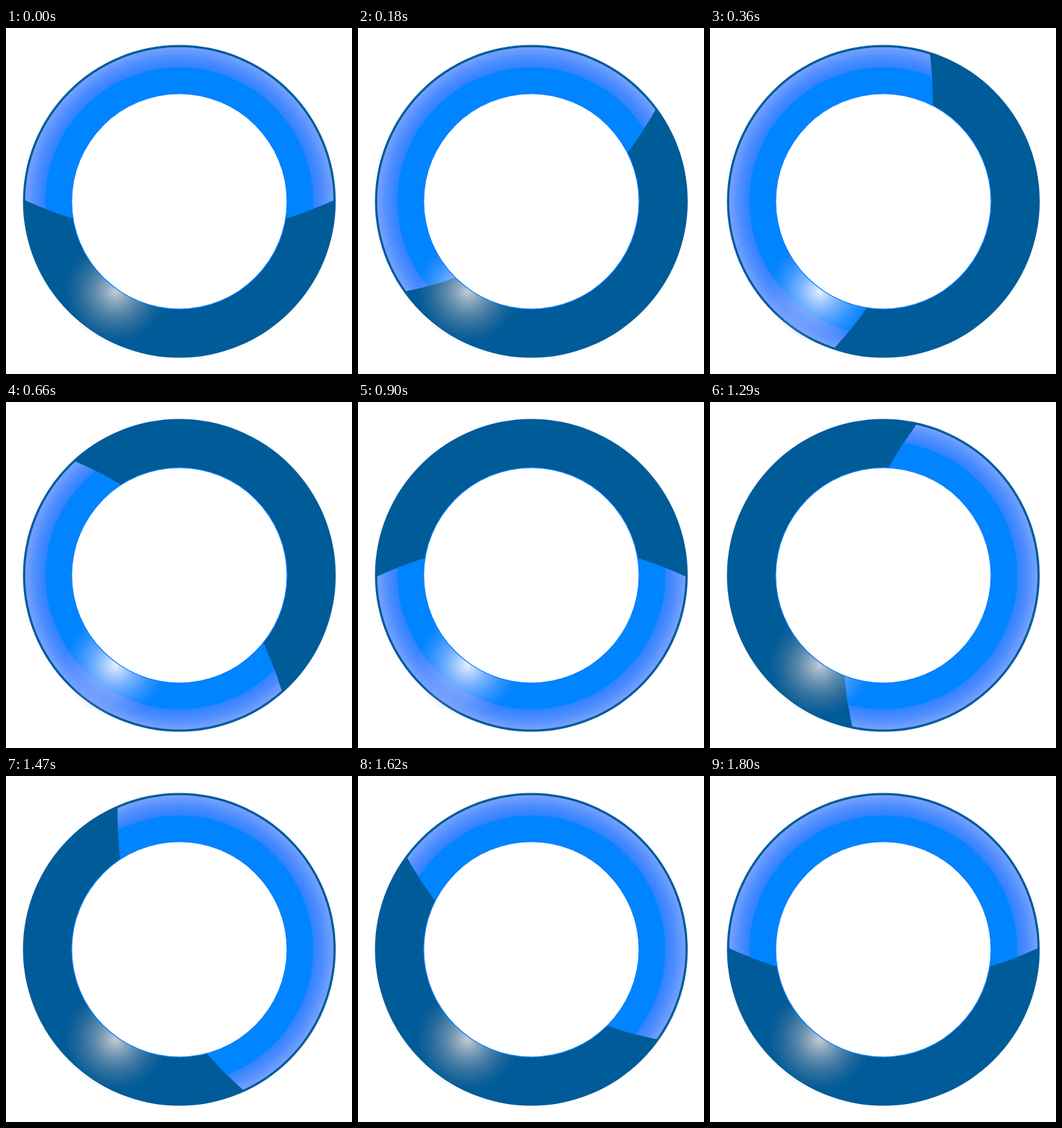
These frames come from a looping animation (500x500 px, 1.83 s). An HTML page with a canvas:

```html
<!DOCTYPE html>
<html>
<head>
<meta charset="utf-8">
<style>
  html, body { margin: 0; width: 100%; height: 100%; overflow: hidden; background: #fff; }
  canvas { display: block; }
</style>
</head>
<body>
<canvas width="500" height="500"></canvas>
<script>
const ctx = document.querySelector('canvas').getContext('2d');
const STEP = 30, LOOP = 1830, TURN_STEPS = 60;
const CENTER = 250.5;

function circle(x, y, r) {
  ctx.beginPath();
  ctx.arc(x, y, r, 0, 2 * Math.PI);
}

function disc(r, fill, x = 0, y = 0) {
  circle(x, y, r);
  ctx.fillStyle = fill;
  ctx.fill();
}

function radial(x, y, r0, r1, ...stops) {
  const g = ctx.createRadialGradient(x, y, r0, x, y, r1);
  stops.forEach(([at, color]) => g.addColorStop(at, color));
  return g;
}

const SHINE = { x: -92, y: 130, r: 74 };
const shineOn = (...stops) => radial(SHINE.x, SHINE.y, 0, SHINE.r, ...stops);

const rim = radial(0, 0, 193.5, 222.7, [0, '#2f82ff'], [0.5, '#4f8dff'], [1, '#74a2ff']);
const darkShine = shineOn([0, 'rgba(225,222,222,.87)'], [1, 'rgba(125,130,145,0)']);
const lightShine = shineOn([0, 'rgba(245,245,255,.95)'], [1, 'rgba(150,165,255,0)']);

function draw(angle) {
  ctx.setTransform(1, 0, 0, 1, 0, 0);
  ctx.fillStyle = '#fff';
  ctx.fillRect(0, 0, 500, 500);
  ctx.translate(CENTER, CENTER);

  disc(226, '#005b99');
  disc(SHINE.r, darkShine, SHINE.x, SHINE.y);

  // The lit part lies inside a large circle that turns about the ring's centre.
  ctx.save();
  circle(485.6 * Math.sin(angle), -485.6 * Math.cos(angle), 533);
  ctx.clip();
  disc(222.7, rim);
  disc(193.5, '#0084ff');
  disc(SHINE.r, lightShine, SHINE.x, SHINE.y);
  ctx.restore();

  disc(156.3, '#0a80ff');
  disc(155, '#fff');
}

function frame(now) {
  const step = Math.floor(now % LOOP / STEP);
  draw(-2 * Math.PI * step / TURN_STEPS);
  requestAnimationFrame(frame);
}

draw(0);
const start = performance.now();
requestAnimationFrame(now => frame(Math.max(0, now - start)));
</script>
</body>
</html>
```
